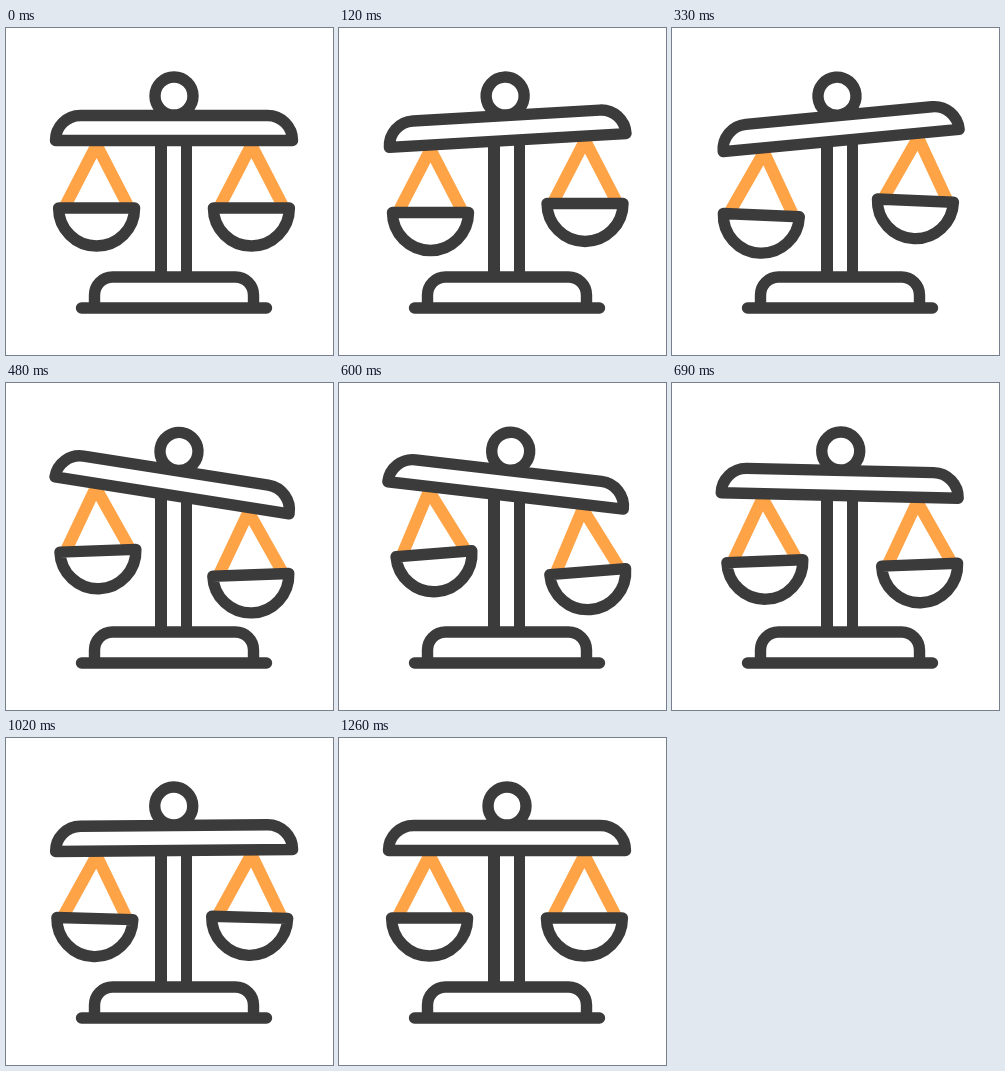
Write an HTML page with a canvas that moves like this. It is 327 by 327 pixels and loops after 1290 ms.

```html
<!DOCTYPE html>
<html lang="en">
<head>
<meta charset="utf-8">
<title>Balance scale</title>
<style>
  html, body { margin: 0; width: 100%; height: 100%; overflow: hidden; background: #fff; }
  canvas { display: block; width: 327px; height: 327px; }
</style>
</head>
<body>
<canvas id="stage"></canvas>
<script>
const SIZE = 327, LOOP = 1290, STEP = 30;
const DARK = '#3b3b3b', ORANGE = '#ffa347';
const PIVOT = { x: 168, y: 100 }, ARM = 77.4, HOOK = 13;

// [time in ms, angle in degrees]
const beamSwing = [[30, 0], [255, -9.5], [505, 9.5], [810, -2.95], [1090, 0]];
const panSwing = [[210, 0], [345, 2.5], [575, -4.7], [860, 2.4], [1260, 0]];

const canvas = document.getElementById('stage');
const ctx = canvas.getContext('2d');
const ratio = window.devicePixelRatio || 1;
canvas.width = canvas.height = Math.round(SIZE * ratio);

function angleAt(keys, t) {
  if (t <= keys[0][0]) return 0;
  for (let i = 1; i < keys.length; i++) {
    const [t0, a0] = keys[i - 1], [t1, a1] = keys[i];
    if (t < t1) {
      const u = (t - t0) / (t1 - t0);
      return (a0 + (a1 - a0) * u * u * (3 - 2 * u)) * Math.PI / 180;
    }
  }
  return 0;
}

function stroke(path, color = DARK, width = 11.4, fill) {
  const shape = new Path2D(path);
  if (fill) {
    ctx.fillStyle = fill;
    ctx.fill(shape);
  }
  ctx.strokeStyle = color;
  ctx.lineWidth = width;
  ctx.stroke(shape);
}

function placed(x, y, angle, paint) {
  ctx.save();
  ctx.translate(x, y);
  ctx.rotate(angle);
  paint();
  ctx.restore();
}

function drawStand() {
  stroke('M155 113V247', DARK, 12);
  stroke('M180.5 113V247', DARK, 11);
  stroke('M88.5 278V267A18 18 0 0 1 106.5 249H229.5A18 18 0 0 1 247.5 267V278');
  stroke('M75.5 280H260.5');
}

// Origin is the hook on the beam.
function drawPan() {
  stroke('M-32 66L0 4L32 66', ORANGE, 12);
  stroke('M-38 67H38A38 38 0 0 1 -38 67Z', DARK, 11.4, '#fff');
}

// Origin is the beam's pivot.
function drawBeam() {
  stroke('M-118.5 12.5A25 25 0 0 1 -93.5 -12.5H93.5A25 25 0 0 1 118.5 12.5Z', DARK, 11.4, '#fff');
  stroke('M-19 -32A19 19 0 0 1 19 -32A19 19 0 0 1 -19 -32Z', DARK, 11.4, '#fff');
}

function draw(t) {
  const tilt = angleAt(beamSwing, t), sway = angleAt(panSwing, t);
  const sin = Math.sin(tilt), cos = Math.cos(tilt);
  ctx.setTransform(ratio, 0, 0, ratio, 0, 0);
  ctx.fillStyle = '#fff';
  ctx.fillRect(0, 0, SIZE, SIZE);
  ctx.lineCap = ctx.lineJoin = 'round';
  drawStand();
  for (const arm of [-ARM, ARM]) {
    placed(PIVOT.x + arm * cos - HOOK * sin, PIVOT.y + arm * sin + HOOK * cos, sway, drawPan);
  }
  placed(PIVOT.x, PIVOT.y, tilt, drawBeam);
}

const start = performance.now();
function tick() {
  const t = (performance.now() - start) % LOOP;
  draw(Math.floor(t / STEP) * STEP);
  requestAnimationFrame(tick);
}
tick();
</script>
</body>
</html>
```
